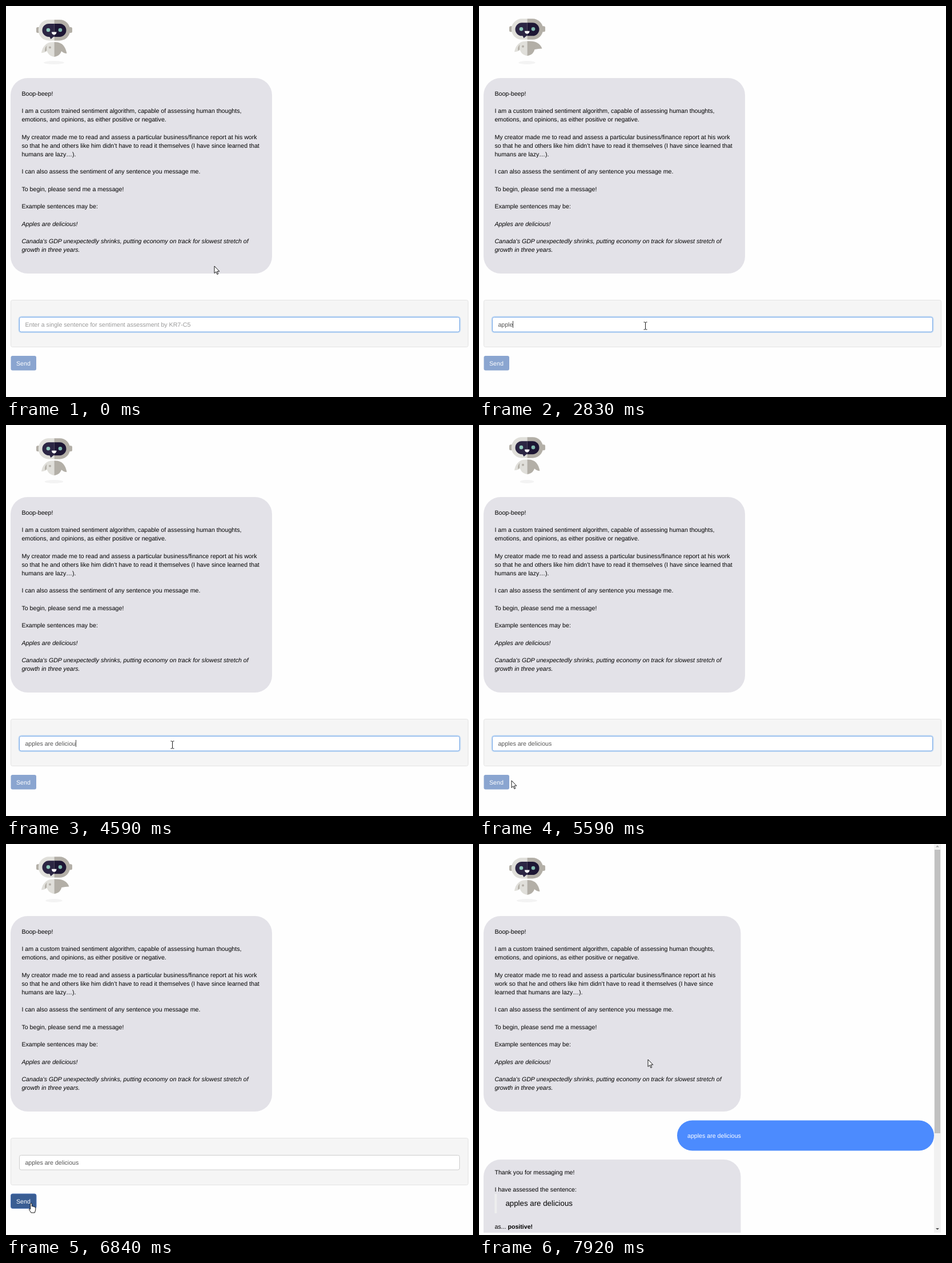
Write an HTML page that moves like this. It is 818 px wide and 684 px high and loops after 8 s.

```html
<!DOCTYPE html>
<html lang="en">
<head>
<meta charset="utf-8">
<title>Sentiment bot</title>
<style>
  html, body { margin: 0; height: 100%; overflow: hidden; background: #fefefe; }
  svg { display: block; width: 100vw; height: 100vh; }
  text {
    font: 10.64px "Liberation Sans", Arial, sans-serif;
    text-rendering: geometricPrecision;
    white-space: pre;
  }
  .light { fill: #e0dfda; }
  .grey { fill: #b3afa7; }
  .bubble { fill: #e3e2e8; }
  .white { fill: #fff; }
  .italic { font-style: italic; }
  .quote { font-size: 13.3px; }
</style>
</head>
<body>
<svg viewBox="0 0 818 684">
  <ellipse id="shadow" cx="84" cy="99" ry="3" fill="#f3f3f3"/>
  <g id="robot">
    <rect class="grey" x="53" y="37" width="8" height="10" rx="2.5"/>
    <rect class="grey" x="108" y="37" width="8" height="10" rx="2.5"/>
    <path class="light" d="M84.5 24H75a18 18 0 0 0 0 36.5H84.5Z"/>
    <path class="grey" d="M84.5 24H94a18 18 0 0 1 0 36.5H84.5Z"/>
    <path fill="#2c2644" d="M84.5 31H75a11.5 11.5 0 0 0 0 23H76.5L78.5 58L83 54H84.5Z"/>
    <path fill="#1d1634" d="M84.5 31H94a11.5 11.5 0 0 1 0 23H84.5Z"/>
    <circle cx="74" cy="42" r="3.3" fill="#8fcabc"/>
    <circle cx="95" cy="42" r="3.3" fill="#7fb9ae"/>
    <path class="white" d="M80 45.5H88.5a4.25 5 0 0 1-8.5 0Z"/>
    <path id="rightArm" class="grey"/>
    <path class="light" d="M84 63.5C72 62 64 70 62 82Q68 82 73 78Z"/>
    <path class="grey" d="M71.5 69Q67 74 68.5 80L71 78Z"/>
    <path class="light" d="M84.5 63.5Q72 63 71 74Q72 87 84.5 89Z"/>
    <path class="grey" d="M84.5 63.5Q97 63 98 74Q97 87 84.5 89Z"/>
    <circle class="grey" cx="77" cy="72.5" r="2"/>
  </g>

  <rect id="intro" class="bubble" x="8" y="126" height="342" rx="30"/>
  <g id="introText"></g>

  <g id="form">
    <rect id="panel" x="8.5" y="514.5" height="82" rx="3" fill="#f5f5f5" stroke="#e3e3e3"/>
    <rect id="glow" x="23" y="544" height="26.5" rx="4" fill="none" stroke="#a9cdf3" stroke-width="3" opacity=".6"/>
    <rect id="input" class="white" x="23.5" y="544.5" height="25.5" rx="3"/>
    <text id="inputText" x="33.4" y="561"></text>
    <rect id="caret" y="551" width="1" height="12" fill="#444"/>
    <rect id="button" x="8.5" y="612" width="44.5" height="25.5" rx="3"/>
    <text class="white" x="18" y="628.5">Send</text>
  </g>

  <g id="chat">
    <rect x="347" y="483.5" width="450" height="53" rx="26.5" fill="#4c8bfe"/>
    <text class="white" x="365" y="514">apples are delicious</text>
    <rect id="pending" class="bubble" x="8" y="551.5" width="450.5" height="1.6"/>
    <g id="reply">
      <rect class="bubble" x="8" y="552" width="450.5" height="200" rx="30"/>
      <text x="27.4" y="578">Thank you for messaging me!</text>
      <text x="27.4" y="608">I have assessed the sentence:</text>
      <rect x="27.4" y="612" width="3.8" height="34" fill="#eee"/>
      <text class="quote" x="46.4" y="633">apples are delicious</text>
      <text x="27.4" y="673">as... <tspan font-weight="bold">positive!</tspan></text>
    </g>
    <rect x="797" width="12" height="680" fill="#f1f1f1"/>
    <rect id="thumb" x="798" y="10" width="10" fill="#c1c1c1"/>
    <path fill="#a3a3a3" d="M800 5.5L803 2.5L806 5.5Z"/>
    <path fill="#505050" d="M800 672L803 675L806 672Z"/>
    <rect y="680" width="818" height="4" fill="#fefefe"/>
  </g>

  <path id="cursor" stroke="#000" stroke-width=".9" stroke-linejoin="round"/>
</svg>
<script>
const LOOP = 8000, BLINK = 530;
const TYPE_START = 2232, KEY_TIME = 129;
const CLICK = 6200, SENT = 7100, REPLIED = 7760;
const MESSAGE = 'apples are delicious';
const PLACEHOLDER = 'Enter a single sentence for sentiment assessment by KR7-C5';

const $ = id => document.getElementById(id);
const set = (id, attrs) => {
  for (const name in attrs) $(id).setAttribute(name, attrs[name]);
};
const show = (id, on) => set(id, { visibility: on ? 'inherit' : 'hidden' });

const wideReport = [
  'My creator made me to read and assess a particular business/finance report at his work',
  'so that he and others like him didn’t have to read it themselves (I have since learned that',
  'humans are lazy…).'];
const narrowReport = [
  'My creator made me to read and assess a particular business/finance report at his',
  'work so that he and others like him didn’t have to read it themselves (I have since',
  'learned that humans are lazy…).'];
const introLines = report => [
  'Boop-beep!', '',
  'I am a custom trained sentiment algorithm, capable of assessing human thoughts,',
  'emotions, and opinions, as either positive or negative.', '',
  ...report, '',
  'I can also assess the sentiment of any sentence you message me.', '',
  'To begin, please send me a message!', '',
  'Example sentences may be:', '',
  'Apples are delicious!', '',
  "Canada's GDP unexpectedly shrinks, putting economy on track for slowest stretch of",
  'growth in three years.'];
const introMarkup = report => introLines(report).map((line, i) =>
  `<text x="27.4" y="${Math.round(156.5 + 15.2 * i)}"${i > 14 ? ' class="italic"' : ''}>${line}</text>`).join('');

// Pointer waypoints: time, x, y
const route = [
  [0, 365, 455], [250, 365, 455], [800, 293, 557], [1100, 295, 562], [1500, 291.5, 559.5],
  [5150, 291.5, 559.5], [5450, 120, 610], [5650, 40, 625], [5900, 40, 646], [6150, 44, 628],
  [6900, 44, 628], [7620, 287, 428], [7920, 296, 377], [8000, 296, 377]];
const shapes = {
  arrow: 'M0 0V12.5L2.9 9.8L4.9 14.5L6.8 13.7L4.8 9.2H8.8Z',
  beam: 'M-3-6.5H-1L0-5.5L1-6.5H3M0-5.5V5.5M-3 6.5H-1L0 5.5L1 6.5H3',
  hand: 'M-1.3 9V1.2Q0-.8 1.3 1.2V6Q2.7 4.8 3.6 6.4Q5 5.4 5.7 7Q7.6 6.4 7.8 8.5V12L6.3 17H0L-3.6 11.5Q-3.9 9.4-1.3 11Z'
};

function pointerAt(t) {
  const i = route.findIndex(p => p[0] > t);
  const [t0, x0, y0] = route[i - 1], [t1, x1, y1] = route[i];
  const u = (t - t0) / (t1 - t0), k = u * u * (3 - 2 * u);
  return [x0 + (x1 - x0) * k, y0 + (y1 - y0) * k];
}

function drawRobot(t) {
  const bob = (Math.cos(2 * Math.PI * (t + 100) / 4000) - 1) / 2;
  set('robot', { transform: `translate(0 ${3 * bob})` });
  set('shadow', { rx: 18 + 6 * bob });
  const wave = Math.max(0, 1 - ((t % 4000 - 2880) / 430) ** 2);
  const tipX = 106.5 + 4 * wave, tipY = 83 - 7 * wave;
  set('rightArm', { d: `M84 63.5C97 62 ${104 + 3 * wave} ${70 - 4 * wave} ${tipX} ${tipY}Q${tipX - 6} ${tipY} 96 78Z` });
}

function drawForm(t, over) {
  const sent = t >= SENT, focused = t < CLICK;
  const typed = Math.min(MESSAGE.length, Math.max(0, Math.floor((t - TYPE_START) / KEY_TIME) + 1));
  const lastKey = typed ? TYPE_START + (typed - 1) * KEY_TIME : 70;
  const text = $('inputText');
  text.textContent = typed ? MESSAGE.slice(0, typed) : PLACEHOLDER;
  text.setAttribute('fill', typed ? '#555' : '#999');
  show('caret', focused && t >= 70 && Math.floor((t - lastKey) / BLINK) % 2 === 0);
  set('caret', { x: Math.round(33 + (typed ? text.getComputedTextLength() : 0)) });

  const width = sent ? 758 : 771;
  set('input', { width, stroke: focused ? '#78a9e8' : '#ccc' });
  set('glow', { width: width + 1 });
  show('glow', focused);
  set('panel', { width: sent ? 788.5 : 801 });
  const dark = over || !focused;
  set('button', { fill: dark ? '#395d93' : '#8aa5d0', stroke: focused ? 'none' : '#4f76b8' });
  set('form', { transform: `translate(0 ${sent ? 54.5 : 0})` });
  show('form', t < REPLIED);
}

let wasSent;
function drawChat(t) {
  const sent = t >= SENT, replied = t >= REPLIED;
  if (sent !== wasSent) $('introText').innerHTML = introMarkup(sent ? narrowReport : wideReport);
  wasSent = sent;
  set('intro', { width: sent ? 450.5 : 458 });
  show('chat', sent);
  show('pending', !replied);
  show('reply', replied);
  set('thumb', { height: replied ? 496 : 632 });
}

function draw(t) {
  const [x, y] = pointerAt(t);
  const inside = (left, top, right, bottom) => x > left && x < right && y > top && y < bottom;
  const overButton = t < SENT && inside(8, 612, 53, 638);
  const overInput = t < SENT && inside(23, 544, 795, 570);
  const shape = overButton ? 'hand' : overInput ? 'beam' : 'arrow';
  drawRobot(t);
  drawForm(t, overButton);
  drawChat(t);
  set('cursor', {
    d: shapes[shape],
    fill: shape === 'beam' ? 'none' : '#fff',
    transform: `translate(${Math.round(x * 2) / 2} ${Math.round(y * 2) / 2})`
  });
}

const start = performance.now();
function tick() {
  draw((performance.now() - start) % LOOP);
  requestAnimationFrame(tick);
}
tick();
</script>
</body>
</html>
```
